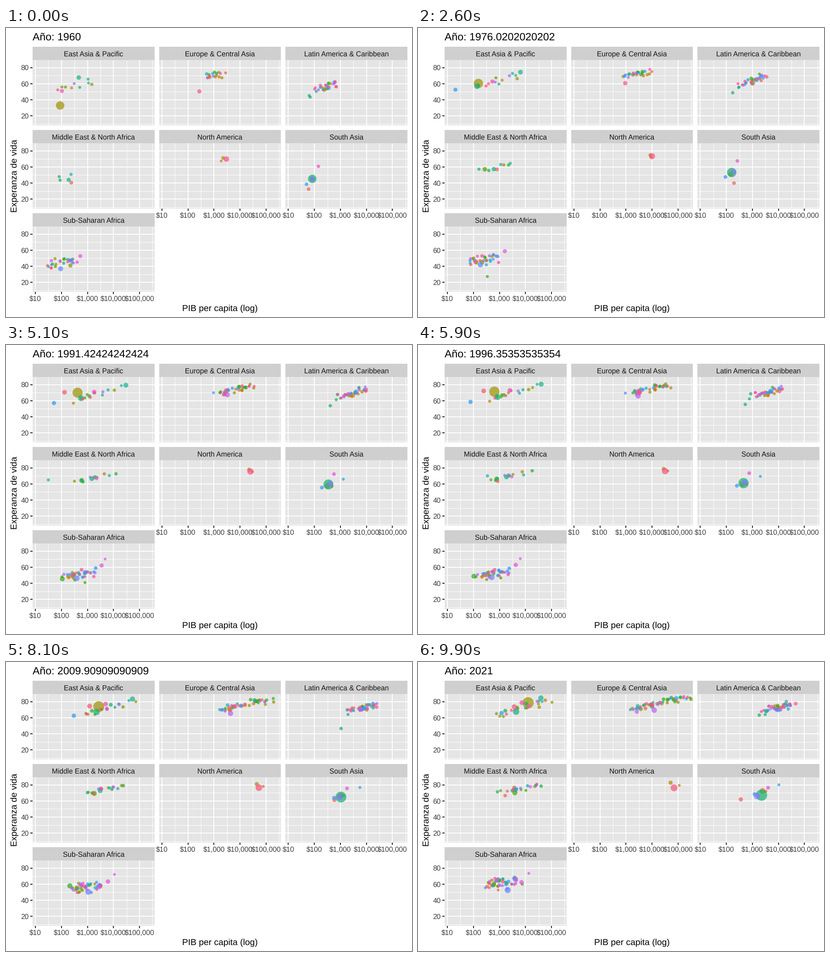
A matplotlib script for the animation above (10000 ms loop, 885x632 px).

```python
import numpy as np
import matplotlib.pyplot as plt
from matplotlib.animation import FuncAnimation
from matplotlib.colors import LinearSegmentedColormap
from matplotlib.patches import Rectangle

W, H, DPI = 885, 632, 64
PT = 72 / DPI
FRAMES, INTERVAL = 100, 100
FIRST, LAST = 1960, 2021
YEARS = np.arange(FIRST, LAST + 1)
T = np.linspace(0, 1, len(YEARS))

plt.rcParams["font.family"] = "Liberation Sans"
plt.rcParams["text.hinting"] = "none"
rng = np.random.default_rng(11)
hues = LinearSegmentedColormap.from_list("hues", [
    "#F35E5A", "#CF7A10", "#989500", "#38AA00", "#12B369", "#17B3B7",
    "#1B9FF5", "#8378FF", "#E053F0", "#FF47AB", "#F35E5A"], N=512)

# ---------- layout ----------
COL_STEP, ROW_STEP = 275.65, 182
LEFT, TOP, PANEL_W, STRIP_H, PANEL_H = 58, 41, 265.8, 29, 142.5
DECADE, PER_YEAR = 56.75, 1.763
X10, Y80 = LEFT + 6.1, TOP + STRIP_H + 16.6
PANELS = ["East Asia & Pacific", "Europe & Central Asia",
          "Latin America & Caribbean", "Middle East & North Africa",
          "North America", "South Asia", "Sub-Saharan Africa"]
EAST, EUROPE, LATIN, MIDDLE, NORTH, SOUTH, AFRICA = range(7)

fig = plt.figure(figsize=(W / DPI, H / DPI), dpi=DPI, facecolor="white")
ax = fig.add_axes([0, 0, 1, 1])
ax.set_xlim(0, W)
ax.set_ylim(H, 0)
ax.axis("off")


def label(x, y, text, px, color="black", ha="center", **kw):
    return ax.text(x, y, text, fontsize=px * PT, color=color, ha=ha,
                   va="baseline", **kw)


def to_stage(panel, log_gdp, life):
    row, col = divmod(panel, 3)
    return (X10 + col * COL_STEP + DECADE * (log_gdp - 1),
            Y80 + row * ROW_STEP + PER_YEAR * (80 - life))


def draw_panel(i, name):
    row, col = divmod(i, 3)
    x0, y0 = LEFT + col * COL_STEP, TOP + row * ROW_STEP
    x1, y1 = x0 + PANEL_W, y0 + STRIP_H
    y2 = y1 + PANEL_H
    ax.add_patch(Rectangle((x0, y0), PANEL_W, STRIP_H, fc="#CFCFCF", lw=0))
    ax.add_patch(Rectangle((x0, y1), PANEL_W, PANEL_H, fc="#E5E5E5", lw=0))
    label((x0 + x1) / 2, y0 + 20.6, name, 15.5, "#141414")

    lives = np.arange(80, 0, -20)
    xt, yt = to_stage(i, np.arange(1, 6), lives)
    for shift, px in ((0.5, 0.95), (0, 1.9)):
        ax.vlines(xt + shift * DECADE, y1, y2, "white", lw=px * PT)
        ax.hlines(yt + shift * 20 * PER_YEAR, x0, x1, "white", lw=px * PT)

    if col == 0:
        ax.hlines(yt, x0 - 5, x0, "#222222", lw=1.9 * PT)
        for y, life in zip(yt, lives):
            label(x0 - 8.5, y + 5.6, str(life), 15.5, "#3D3D3D", "right")
    if i >= 4:
        ax.vlines(xt, y2, y2 + 5, "#222222", lw=1.9 * PT)
        for k, x in enumerate(xt, 1):
            label(x, y2 + 20.2, f"${10 ** k:,}", 15.5, "#3D3D3D")


for i, name in enumerate(PANELS):
    draw_panel(i, name)
title = label(58, 26.5, "", 23.1, ha="left")
label(466.8, 618.6, "PIB per capita (log)", 19.3)
label(23.6, 323.5, "Experanza de vida", 19.3, rotation=90,
      rotation_mode="anchor")

# ---------- bubbles: one stage position per year ----------
bubbles = []


def add(panel, hue, pop, log_gdp, life, alive):
    x, y = to_stage(panel, log_gdp, life)
    bubbles.append((hue, np.where(alive, x, np.nan), y, pop * (0.45 + 0.55 * T)))


def country(panel, hue, pop, *points, span=(FIRST, LAST), shock=None):
    """A smooth path through (gdp, life) points spread evenly over the span."""
    gdp, life = np.array(points, float).T
    scale = lambda years: (years - span[0]) / (span[1] - span[0])
    knots = np.linspace(0, 1, len(points))
    curve = lambda v: np.polyval(np.polyfit(knots, v, len(v) - 1), scale(YEARS))
    lives = curve(life)
    if shock:
        lives[YEARS == shock[0]] = shock[1]
    alive = (YEARS >= span[0]) & (YEARS <= span[1])
    add(panel, hue, pop, curve(np.log10(gdp)), lives, alive)


def ease_out(power):
    return 1 - (1 - T) ** power


def sway(size):
    return size * np.sin(2 * np.pi * (rng.uniform(0.5, 1.6) * T + rng.random()))


def cloud(panel, count, gdp, life, spread, slope, noise, biggest, bend=2):
    """Smaller countries around a trend; each pair runs from first to last."""
    g0, g1 = np.log10(gdp)
    center = g0 + (g1 - g0) * ease_out(1.4)
    level = life[0] + (life[1] - life[0]) * ease_out(bend)
    width = spread[0] + (spread[1] - spread[0]) * T
    alive = count[0] + (count[1] - count[0]) * T
    for k, rank in enumerate(rng.permutation(np.linspace(-1.7, 1.7, count[1]))):
        dx = width * (rank + sway(0.3))
        own = np.clip(rng.normal(0, 0.75), -1.5, 1.5) + sway(0.6)
        x = center + dx + rng.normal(0, 0.016, len(T))
        y = level + slope * dx + noise * own + rng.normal(0, 0.15, len(T))
        add(panel, rng.random(), 10 ** rng.uniform(-0.6, biggest), x, y,
            alive > k + 0.999)


country(EAST, .19, 1412, (89, 33), (195, 64.3), (960, 72), (12600, 78.5))
country(EAST, .415, 274, (54, 52), (700, 64), (4330, 67.6), span=(1967, LAST))
country(EAST, .45, 126, (464, 67.7), (28000, 79), (39000, 84.5))
country(EAST, .885, 71, (104, 51), (1700, 70.5), (7200, 78.7))
country(EAST, .61, 54, (13, 48), (50, 57), (1200, 65.7), span=(1961, LAST))
country(EAST, .97, 97, (95, 69.5), (700, 74), (3700, 73.6), span=(1989, LAST))
cloud(EAST, (9, 20), (330, 8400), (58, 73), (.4, .57), 9.5, 3, 1.5)

country(EUROPE, .92, 84, (275, 50.5), (2400, 67.7), (9660, 76))
country(EUROPE, .76, 144, (3780, 69), (3300, 64.8), (12200, 69.4),
        span=(1988, LAST))
cloud(EUROPE, (17, 48), (1080, 20000), (70.6, 78), (.25, .63), 6.5, 2.3, 1.75,
      bend=.8)

country(LATIN, .12, 214, (235, 53), (2700, 66.5), (7500, 72.8))
country(LATIN, .59, 127, (350, 55), (3750, 70.5), (10050, 70.2))
country(LATIN, .39, 11, (69, 43.5), (390, 53.5), (1830, 63.2),
        shock=(2010, 45.3))
cloud(LATIN, (25, 37), (253, 9800), (56, 72.3), (.3, .35), 8, 3, 1.3)

country(MIDDLE, .01, 44, (240, 40.5), (1750, 67.5), (3700, 76.4))
country(MIDDLE, .28, 109, (170, 50), (650, 65), (3900, 70.2),
        span=(1965, LAST))
country(MIDDLE, .42, 88, (190, 44), (1400, 66), (4100, 73.9))
country(MIDDLE, .5, 6, (25, 64.5), (6000, 76), (4100, 75), span=(1991, LAST))
cloud(MIDDLE, (3, 17), (220, 7000), (48, 76), (.3, .5), 7, 3, 1.3)

country(NORTH, .95, 332, (3000, 69.8), (24000, 75.4), (70200, 76.3))
country(NORTH, .165, 38, (2260, 71.1), (21400, 77.6), (52000, 82.6))
country(NORTH, .095, .06, (1900, 67.4), (28000, 75), (112000, 79.3))

country(SOUTH, .405, 1408, (83, 45.2), (330, 59), (2240, 67.2))
country(SOUTH, .70, 231, (83, 45), (385, 60), (1500, 66))
country(SOUTH, .075, 169, (84, 45), (295, 57), (2460, 72.4))
country(SOUTH, .63, 30, (50, 38.5), (185, 55), (1220, 68.4))
country(SOUTH, .83, 22, (143, 60.8), (540, 72), (4010, 76.4))
country(SOUTH, 0, 30, (60, 32.5), (135, 37), (270, 43), span=(FIRST, 1981))
country(SOUTH, 0, 40, (180, 56.5), (620, 61.5), (360, 62), span=(2001, LAST))
country(SOUTH, .1, .8, (330, 50), (740, 62), (3270, 72), span=(1980, LAST))
country(SOUTH, .55, .5, (400, 56), (2850, 72), (10400, 80), span=(1980, LAST))

country(AFRICA, .67, 213, (93, 37), (370, 46), (2070, 52.7))
country(AFRICA, .82, 60, (530, 52.7), (3350, 62), (7050, 62.3))
country(AFRICA, .33, 120, (200, 38), (115, 52), (925, 65), span=(1981, LAST))
country(AFRICA, .23, 96, (220, 41), (250, 49), (580, 59.2))
country(AFRICA, .77, 13, (41, 47), (260, 50), (820, 66), shock=(1994, 14))
country(AFRICA, .79, .1, (2100, 69), (7700, 71), (13300, 73.4),
        span=(1980, LAST))
country(AFRICA, .3, 1.6, (220, 31), (450, 31), (1600, 52), (7500, 60),
        span=(1962, LAST))
cloud(AFRICA, (25, 44), (97, 1260), (44.6, 61.6), (.3, .37), 4, 4, 1.35,
      bend=.7)

bubbles.sort(key=lambda b: b[0])
colors = hues(np.array([b[0] for b in bubbles]))
colors[:, 3] = 0.7
xs, ys, pops = (np.array([b[j] for b in bubbles]) for j in (1, 2, 3))
dots = ax.scatter([], [], linewidths=0, zorder=5)


def tween(table, year):
    i = min(int(year - FIRST), len(YEARS) - 2)
    f = year - YEARS[i]
    a, b = table[:, i], table[:, i + 1]
    # an absent neighbour must not hide an exact year
    return a if f == 0 else b if f == 1 else a + (b - a) * f


def draw(frame):
    year = FIRST + (LAST - FIRST) * frame / (FRAMES - 1)
    x, y, pop = (tween(t, year) for t in (xs, ys, pops))
    on = ~np.isnan(x)
    radius = 3 + 9.3 * np.sqrt(pop[on] / 1412)
    dots.set_offsets(np.column_stack([x[on], y[on]]))
    dots.set_sizes((2 * radius * PT) ** 2)
    dots.set_facecolors(colors[on])
    title.set_text(f"Año: {year:.15g}")
    return dots, title


anim = FuncAnimation(fig, draw, frames=FRAMES, interval=INTERVAL,
                     repeat=True, repeat_delay=0, blit=False)
plt.show()
```
